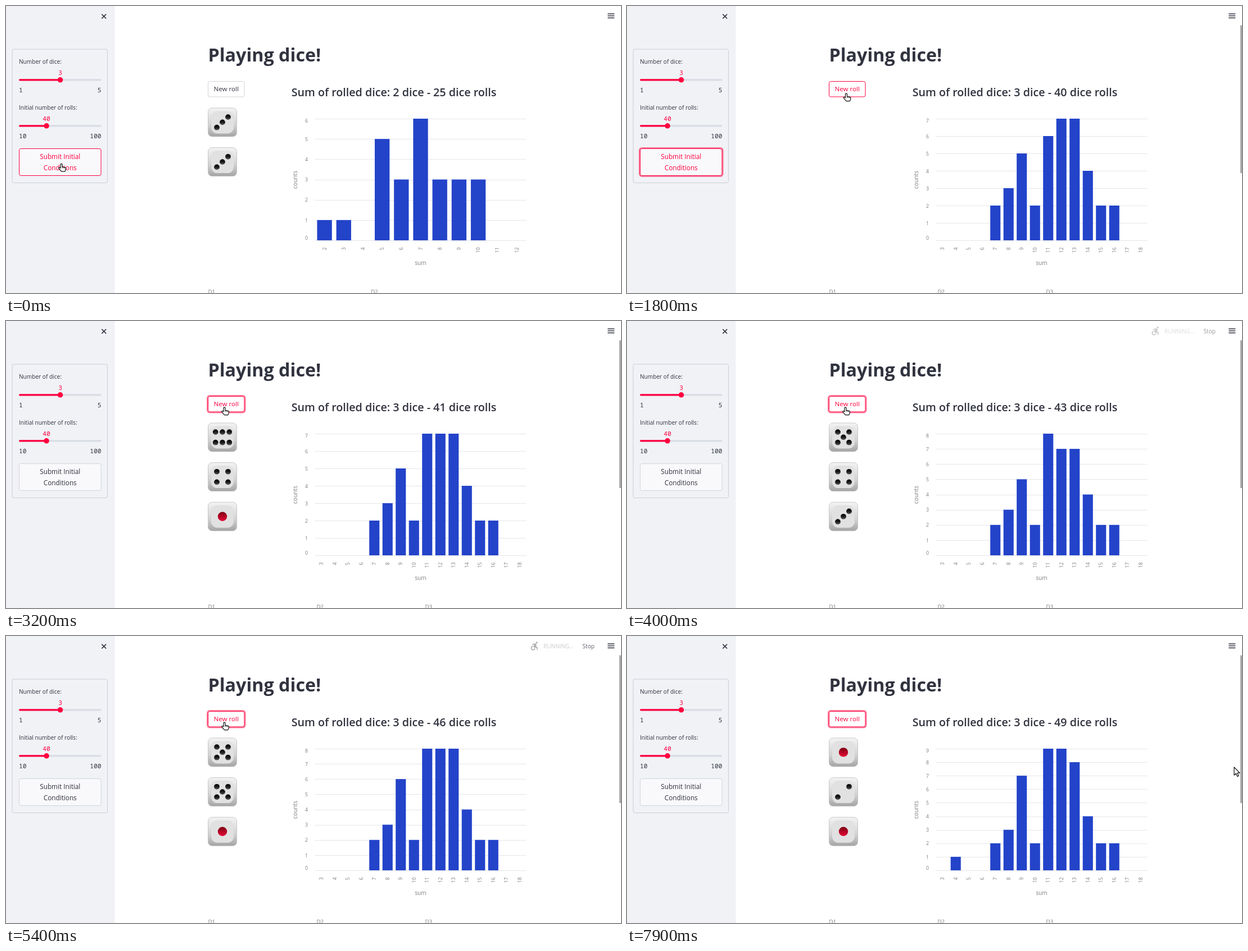
Recreate the animation shown at these times as an HTML page. Size 1094 by 512 pixels, loop 8 s.

```html
<!DOCTYPE html>
<html lang="en">
<head>
<meta charset="utf-8">
<title>Playing dice</title>
<style>
html, body { margin: 0; width: 100%; height: 100%; overflow: hidden; background: #fff; }
svg { display: block; width: 1094px; height: 512px; }
text { font-family: "Open Sans", "Noto Sans", sans-serif; white-space: pre; }
.mono { font-family: "Noto Sans Mono", monospace; }
</style>
</head>
<body>
<svg id="stage" viewBox="0 0 1094 512"></svg>
<script>
const LOOP = 8000, STEP = 100;
const RED = '#ff003f', DARK = '#31333f', GREY = '#7d7d80', BLUE = '#2343c9';

// Each new roll: time of the result and the three dice.
const rolls = [
  [2800, 6, 4, 1], [3250, 2, 6, 3], [3900, 5, 4, 3],
  [4530, 4, 3, 2], [5130, 6, 4, 3], [5380, 5, 5, 1],
  [5830, 6, 2, 4], [6300, 2, 6, 1], [6850, 1, 2, 1]
];
const SUBMITTED = 1200;   // three dice replace two
const CHART_LAG = 150;
const runs = [SUBMITTED, ...rolls.map(r => r[0])];

const pairCounts = [1, 1, 0, 5, 3, 6, 3, 3, 3, 0, 0];
const tripleCounts = [0, 0, 0, 0, 2, 3, 5, 2, 6, 7, 7, 4, 2, 2, 0, 0];

// Pointer path: time, x, y
const path = [
  [0, 98.5, 281], [900, 98.5, 281], [1100, 165, 262], [1700, 426, 150],
  [1800, 390, 155.5], [2100, 388.5, 153.5], [7000, 388.5, 153.5],
  [7100, 482, 180], [7500, 800, 274], [7900, 1080, 234], [8000, 1080, 234]
];

const icons = [
  'M12 2a2 2 0 1 1 0 4 2 2 0 0 1 0-4zM21 9h-6v13h-2v-6h-2v6H9V9H3V7h18z',
  'M18 2.5a2 2 0 1 1 0 4 2 2 0 0 1 0-4zM15 17h-2a3 3 0 1 1-3-3v-2a5 5 0 1 0 5 5z' +
  'M18 13.5h-1.9l1.7-3.7C18.4 8.5 17.4 7 16 7h-5.2c-.8 0-1.6.5-1.9 1.2L8.2 10l1.9.5.7-1.5H13' +
  'l-1.8 4.1c-.6 1.3.4 2.9 1.8 2.9h5v5h2v-5.5c0-1.1-.9-2-2-2z'
];

const text = (s, x, y, size, fill = DARK, more = '') =>
  `<text x="${x}" y="${y}" font-size="${size}" fill="${fill}" ${more}>${s}</text>`;
const rect = (x, y, w, h, fill, more = '') =>
  `<rect x="${x}" y="${y}" width="${w}" height="${h}" fill="${fill}" ${more}/>`;
const line = (d, color, width, more = '') =>
  `<path d="${d}" fill="none" stroke="${color}" stroke-width="${width}" ${more}/>`;
const MID = 'text-anchor="middle"', END = 'text-anchor="end"';
const turned = (x, y, more) => `transform="rotate(-90 ${x} ${y})" ${more}`;

const defs = `<defs>
  <linearGradient id="body" x2="0" y2="1"><stop stop-color="#f3f3f3"/><stop offset=".6" stop-color="#d2d2d2"/><stop offset="1" stop-color="#a4a4a4"/></linearGradient>
  <linearGradient id="pip" x2="0" y2="1"><stop stop-color="#080808"/><stop offset=".5" stop-color="#191919"/><stop offset="1" stop-color="#5c5c5c"/></linearGradient>
  <linearGradient id="ace" x2="0" y2="1"><stop stop-color="#7d0012"/><stop offset="1" stop-color="#e80838"/></linearGradient>
</defs>`;

function button(x, y, w, h, labels, size, fill, { hot, focus, active }) {
  const cx = x + w / 2, top = y + h / 2 - (labels.length - 1) * 10 + 4.2;
  const ring = focus
    ? rect(x - 1.3, y - 1.3, w + 2.6, h + 2.6, 'none', `rx="4.5" stroke="${RED}" stroke-opacity=".5" stroke-width="2.6"`)
    : '';
  const lit = hot || focus;
  return ring +
    rect(x, y, w, h, active ? RED : fill, `rx="3.2" stroke="${lit ? RED : '#d3d4da'}"`) +
    labels.map((s, i) => text(s, cx, top + i * 20, size, active ? '#fff' : lit ? RED : DARK, MID)).join('');
}

function slider(label, y, value, pos, min, max) {
  const mono = 'class="mono" ';
  return text(label, 23, y - 28.5, 10.1) +
    text(value, pos, y - 9, 11.2, RED, mono + MID) +
    rect(23, y - 1.6, 146.5, 3.2, '#d9dce4', 'rx="1.6"') +
    rect(23, y - 1.6, pos - 23, 3.2, RED, 'rx="1.6"') +
    `<circle cx="${pos}" cy="${y}" r="4.8" fill="${RED}"/>` +
    text(min, 23, y + 22.4, 11.2, DARK, mono) +
    text(max, 169.5, y + 22.4, 11.2, DARK, mono + END);
}

function die(n, i) {
  let spots = [];
  if (n > 1 && n < 6) spots.push([10, -9.3], [-10, 9.3]);
  if (n === 4 || n === 5) spots.push([-10, -9.3], [10, 9.3]);
  if (n === 3 || n === 5) spots.push([0, 0]);
  if (n === 6) for (const x of [-12.3, 0, 12.3]) spots.push([x, -9.3], [x, 9.3]);
  const pips = n === 1
    ? '<circle r="8.2" fill="url(#ace)"/>'
    : spots.map(([x, y]) => `<circle cx="${x}" cy="${y}" r="4.9" fill="url(#pip)"/>`).join('');
  return `<g transform="translate(385 ${207.4 + 70.7 * i})">` +
    rect(-25.5, -25.5, 51, 51, 'url(#body)', 'rx="7" stroke="#bdbdbd" stroke-width=".8"') +
    rect(-20, -20, 40, 40, '#e1e1e1', 'rx="11"') + pips + '</g>';
}

function chart(counts, first) {
  const left = 549.5, width = 376, base = 418, height = 217;
  const max = Math.max(...counts), band = width / counts.length;
  let out = '';
  for (let v = 0; v <= max; v++) {
    const y = base - height * v / max;
    const shift = v === 0 ? -4 : v === max ? 4 : .5;
    out += line(`M${left} ${Math.round(y) + .5}h${width}`, '#e6e6ea', 1) +
      text(v, 537, y + shift + 3.2, 8.8, GREY, END);
  }
  counts.forEach((n, i) => {
    const cx = left + band * (i + .5), h = height * n / max;
    if (n) out += rect(cx - band * .385, base - h, band * .77, h, BLUE);
    out += text(first + i, cx + 3.1, 430.5, 8.8, GREY, turned(cx + 3.1, 430.5, END));
  });
  return out + text('sum', 737.5, 462, 10.2, GREY, MID) +
    text('counts', 517.5, 310, 10.3, GREY, turned(517.5, 310, MID));
}

// Fades in for 200 ms after each run starts and out again.
function status(t) {
  let alpha = 0, icon = 0;
  runs.forEach((start, i) => {
    const a = Math.max(0, 1 - Math.abs(t - start - 200) / 200);
    if (a > 0 && !alpha) icon = i < 7 ? 1 : 0;
    alpha += a;
  });
  if (!alpha) return '';
  return `<g opacity="${Math.min(1, alpha)}">` +
    `<path d="${icons[icon]}" fill="#949496" transform="translate(929.5 8) scale(.8)"/>` +
    text('RUNNING...', 956, 22, 10, '#b9babe') + text('Stop', 1025.5, 22, 10.2) + '</g>';
}

function pointer(t) {
  const i = Math.max(1, path.findIndex(p => p[0] >= t));
  const [t0, x0, y0] = path[i - 1], [t1, x1, y1] = path[i];
  const k = (t - t0) / (t1 - t0), x = x0 + (x1 - x0) * k, y = y0 + (y1 - y0) * k;
  const hand = t < 1000 || (t >= 1800 && t <= 7000);
  const d = hand
    ? 'M-1.5 1.3q1.5-2 3 0v4.5l5 1q1.7.5 1.5 2l-.8 3.4-1 2H0l-4.6-5.6q-.5-2 1.5-1.5l1.6 1.2z'
    : 'M0 0v14.2l3.3-3 2.4 5.4 2.4-1.1-2.4-5.2h4.4z';
  return `<path d="${d}" transform="translate(${x} ${y})" fill="#fff" stroke="#111" stroke-width="1.2" stroke-linejoin="round"/>` +
    (hand ? line(`M${x + 1.5} ${y + 6}v2.6m2.3-2v2m2.2-1.5v1.7`, '#111', .8) : '');
}

function draw(t) {
  const done = rolls.filter(r => t >= r[0]);
  const three = t >= SUBMITTED;
  const n = three ? 3 : 2;
  const dice = done.length ? done[done.length - 1].slice(1) : three ? [] : [3, 3];

  const counts = [...(three ? tripleCounts : pairCounts)];
  for (const [time, a, b, c] of rolls) if (t >= time + CHART_LAG) counts[a + b + c - 3]++;

  const submit = { hot: t < 700, focus: t >= 700 && t < 2400, active: t >= 700 && t < 900 };
  const roll = {
    hot: t >= 1800,
    focus: t >= 2400,
    active: rolls.some(([r]) => t >= r - 400 && t < r - 250)
  };

  let out = defs + rect(0, 0, 193.5, 512, '#f0f2f6') +
    line('M170.3 14.6l7.8 7.8m0-7.8l-7.8 7.8', DARK, 1.5) +
    line('M1070.3 13.9h12m-12 3.7h12m-12 3.7h12', DARK, 1.5) +
    rect(11, 77, 169.5, 238.5, 'none', 'rx="3.2" stroke="#cbcdd5"') +
    slider('Number of dice:', 131.8, 3, 96.5, 1, 5) +
    slider('Initial number of rolls:', 213.8, 40, 72, 10, 100) +
    button(23.5, 254.5, 145.5, 48, ['Submit Initial', 'Conditions'], 11.75, '#f9f9fb', submit) +
    text('Playing dice!', 359.4, 99.3, 32.3, DARK, 'font-weight="700"') +
    button(359.5, 134.5, 64.5, 27.5, ['New roll'], 11.6, '#fff', roll) +
    text(`Sum of rolled dice: ${n} dice - ${three ? 40 + done.length : 25} dice rolls`,
      690, 161.3, 19.7, DARK, 'font-weight="600" ' + MID) +
    dice.map(die).join('') + chart(counts, n);

  for (let i = 0; i < n; i++) out += text('D' + (i + 1), 359.4 + i * 579 / n, 513, 9.8, GREY);
  if (three) out += rect(1091, 34.5, 3, 263.5, '#a8a8a8');
  stage.innerHTML = out + status(t) + pointer(t);
}

const stage = document.getElementById('stage');
const began = performance.now();
let shown = -1;
function tick() {
  const t = Math.floor((performance.now() - began) % LOOP / STEP) * STEP;
  if (t !== shown) draw(shown = t);
  requestAnimationFrame(tick);
}
tick();
</script>
</body>
</html>
```
